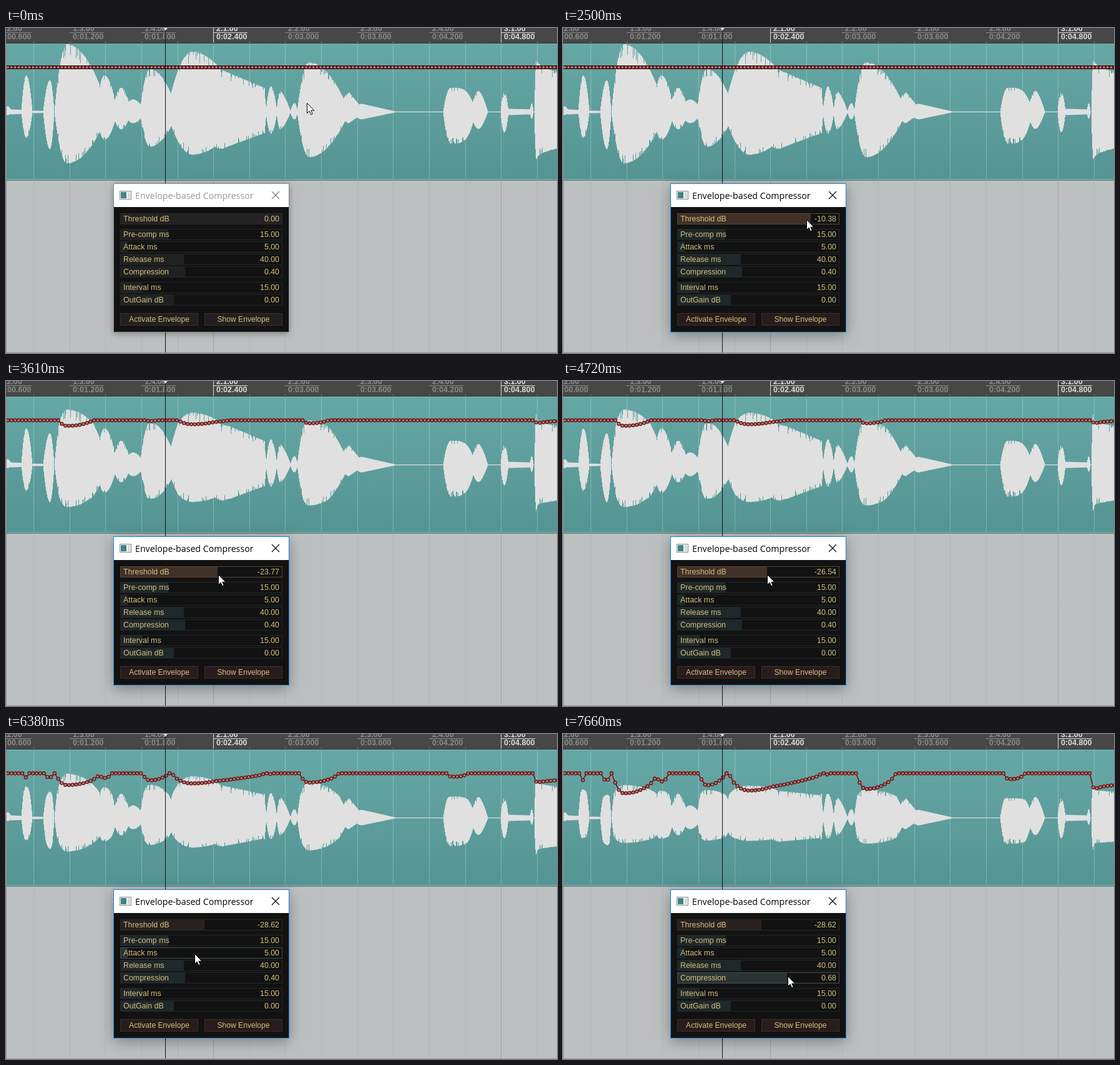
Recreate the animation shown at these times as an HTML page with a canvas. Size 883x521 px, loop 8000 ms.

```html
<!DOCTYPE html>
<html lang="en">
<head>
<meta charset="utf-8">
<title>Envelope-based Compressor</title>
<style>
html, body { margin: 0; width: 883px; height: 521px; overflow: hidden; background: #bcc0c0; }
canvas { display: block; }
</style>
</head>
<body>
<canvas id="stage" width="883" height="521"></canvas>
<script>
const W = 883, H = 521, LOOP = 8000, MID = 134.5, BEAT = 57.63, GRID0 = 44, DOT = 5.76;
const SANS = '"Liberation Sans", Arial, sans-serif';
const c = document.getElementById('stage').getContext('2d');

// Sound bursts: start, peak, end, height up, height down, decay power, level kept at the end
const BURSTS = [
  [-6, 2, 9, 9, 5], [4, 8, 26, 4, 4, 1, .8], [24, 32, 42, 59, 42], [40, 44, 78, 2, 2],
  [59, 70, 77, 51, 60], [77, 97, 165, 109, 83], [144, 157, 178, 59, 45], [170, 184, 200, 39, 28],
  [188, 203, 222, 20, 18], [214, 230, 275, 69, 56], [257, 298, 382, 97, 69], [300, 345, 414, 68, 60, 1, .57],
  [416, 424, 434, 41, 35], [433, 439, 456, 33, 28, 1.5], [455, 462, 467, 14, 12], [466, 485, 550, 80, 73],
  [535, 549, 575, 32, 18, 1], [555, 570, 627, 13, 12, 1], [700, 712, 752, 39, 51, 4],
  [744, 757, 772, 34, 28, 1.5], [792, 798, 805, 32, 33], [802, 806, 842, 5, 5, 1, .8],
  [839, 842, 845, 14, 11], [846, 850, 900, 88, 80, .35, .7]
];

// Hand movement and settings: time, cursor x, cursor y, threshold, compression
const POSES = [
  [0, 482, 120, 0, .4], [870, 185, 345, 0, .4], [1040, 210, 427, 0, .4], [1420, 335, 387, 0, .4],
  [2130, 431, 307, 0, .4], [2500, 390, 307, -10.38, .4], [3240, 340, 310, -23.77, .4],
  [4345, 339, 310, -23.77, .4], [4720, 327, 310, -26.54, .4], [5090, 317, 310, -28.62, .4],
  [5830, 317, 310, -28.62, .4], [6380, 302, 352, -28.62, .4], [6750, 290, 394, -28.62, .4],
  [7480, 360, 388, -28.62, .68]
];

// Picture changes: first, last, count
const RUNS = [[0, 0, 1], [180, 1220, 7], [1420, 2130, 5], [2500, 3240, 5], [3610, 3610, 1], [4160, 4160, 1],
  [4530, 5090, 4], [5460, 5460, 1], [6010, 6930, 6], [7110, 7660, 4]];
const STEPS = RUNS.flatMap(([a, b, n]) =>
  Array.from({ length: n }, (_, i) => n < 2 ? a : Math.round((a + (b - a) * i / (n - 1)) / 10) * 10));

function poseAt(t) {
  const i = POSES.findIndex(p => p[0] > t);
  if (i < 0) return POSES[POSES.length - 1];
  const a = POSES[i - 1], b = POSES[i], k = (t - a[0]) / (b[0] - a[0]);
  return a.map((v, j) => v + (b[j] - v) * k);
}

function noise(n) {
  const v = Math.sin(n * 127.1 + 11.7) * 43758.5453;
  return v - Math.floor(v);
}

function shape(x, [a, peak, b, , , power = 2, keep = 0]) {
  if (x <= a || x >= b + 3) return 0;
  if (x < peak) return 1 - ((peak - x) / (peak - a)) ** 2;
  if (x > b) return keep * (1 - (x - b) / 3);
  return 1 - (1 - keep) * ((x - peak) / (b - peak)) ** power;
}

const loud = side => Array.from({ length: W + 12 }, (_, x) =>
  Math.max(.6, ...BURSTS.map(b => shape(x, b) * b[side])));
const up = loud(3), down = loud(4);

// Level in dB, averaged over a short window
const level = up.map((_, x) => {
  let sum = 0, n = 0;
  for (let i = Math.max(0, x - 3); i <= Math.min(up.length - 1, x + 3); i++, n++) sum += (up[i] + down[i]) / 2;
  return 20 * Math.log10(sum / n / 96) - 19.4;
});

// Gain reduction in pixels of envelope travel
function cutAt(x, env) {
  return env ? Math.max(0, level[Math.round(x)] - env.thr) * env.comp / .1954 : 0;
}

// Thin notches along the louder edges
function ragged(h, seed) {
  if (h < 24) return h;
  const r = noise(seed);
  return r > .78 ? h * (1 - .2 * noise(seed + 5000)) : h * (1 - .02 * r);
}

function rect(x, y, w, h, color) {
  c.fillStyle = color;
  c.fillRect(x, y, w, h);
}

function text(s, x, y, font, color, align = 'left') {
  c.font = font;
  c.fillStyle = color;
  c.textAlign = align;
  c.fillText(s, x, y);
}

function box(x, y, w, h, fill, edge) {
  rect(x, y, w, h, edge);
  rect(x + 1, y + 1, w - 2, h - 2, fill);
}

function path(points, close) {
  c.beginPath();
  for (const [x, y] of points) c.lineTo(x, y);
  if (close) c.closePath();
}

function ruler() {
  rect(0, 0, W, 25, '#474747');
  for (let i = 0; i < 15; i++) rect(Math.round(GRID0 + i * BEAT), 22, 1, 3, '#8f8f8f');
  for (let i = 0; i < 8; i++) {
    const x = Math.round(GRID0 + (2 * i - 1) * BEAT), beat = i + 1, major = beat % 4 === 0;
    const color = major ? '#dcdcdc' : '#8a8a8a', font = `bold 12.5px ${SANS}`;
    if (major) rect(x, 0, 1, 25, color);
    rect(x, 7, 55, 1, color);
    text(`${1 + (beat >> 2)}.${beat % 4 + 1}.00`, x + 5, 4.5, font, color);
    text(`0:0${(beat * .6).toFixed(3)}`, x + 5, 18, font, color);
  }
}

function track(env) {
  const g = c.createLinearGradient(0, 25, 0, 244);
  g.addColorStop(0, '#66a8a6');
  g.addColorStop(.45, '#5e9f9d');
  g.addColorStop(1, '#549493');
  rect(0, 24, W, 1, '#2d3c3c');
  rect(0, 25, W, 219, g);
  rect(0, 25, W, 1, '#7dbab8');
  rect(0, 242, W, 1, '#7ab3b1');
  rect(0, 244, W, 1, '#858a8a');
  for (let i = 0; i < 15; i++) {
    const x = Math.round(GRID0 + i * BEAT), bar = i % 8 === 5;
    for (let y = 28; y < 242; y += 2) rect(x, y, 1, 1, 'rgba(225,240,240,.6)');
    for (let y = 246; y < 520; y += 2) rect(x, y, 1, bar ? 1 : 2, bar ? '#858888' : '#b2b6b6');
  }
  for (let x = 1; x < W; x++) {
    const gain = Math.exp(-.0225 * cutAt(x, env));
    const top = Math.max(25, MID - Math.max(.6, ragged(up[x], x) * gain));
    const bottom = MID + Math.max(.6, ragged(down[x], x + 2000) * gain);
    rect(x, top, 1, bottom - top, '#e0e0e0');
  }
}

function envelope(env) {
  const dots = [];
  for (let x = 3; x < W + 6; x += DOT) dots.push([x, 63 + cutAt(x, env)]);
  if (env) {
    path([[1, dots[0][1]], ...dots]);
    c.strokeStyle = '#6d1010';
    c.lineWidth = 1.6;
    c.stroke();
  } else {
    rect(1, 60, W, 6, '#2b1010');
    rect(1, 61, W, 4, '#800c0c');
  }
  c.lineWidth = 1.3;
  c.strokeStyle = '#7d0808';
  c.fillStyle = env ? '#8c8a88' : '#a09694';
  for (const [x, y] of dots) {
    c.beginPath();
    c.arc(x, y, env ? 2.5 : 1.7, 0, 7);
    c.fill();
    if (env) c.stroke();
  }
}

function playhead() {
  rect(255, 4, 1, 517, '#101010');
  path([[252, 0], [259, 0], [255.5, 4]], true);
  c.fillStyle = '#e8e8e8';
  c.fill();
}

// Colours of a slider: resting, awake, under the cursor
const WARM = { edge: ['#2c2a2a', '#302926', '#5a4638'], fill: ['#242222', '#2a2220', '#403128'] };
const COOL = { edge: ['#222728', '#222728', '#435052'], fill: ['#202122', '#1f282a', '#2b3435'] };

function slider({ y, name, value, part, look = COOL }, mood) {
  const width = Math.round(259 * part), font = `12.4px ${SANS}`;
  box(183, y, 260, 18, '#121212', look.edge[mood]);
  rect(184, y + 1, width - 1, 16, look.fill[mood]);
  text(name, 188, y + 13, font, '#d6bf7d');
  text(value.toFixed(2), 438, y + 13, font, '#d6bf7d', 'right');
}

function panel(t, cx, cy, thr, comp) {
  const on = t >= 2500;
  c.save();
  c.shadowColor = on ? 'rgba(0,0,0,.36)' : 'rgba(0,0,0,.38)';
  c.shadowBlur = on ? 22 : 11;
  c.shadowOffsetY = on ? 5 : 2;
  rect(173, 250, 280, 237, '#121212');
  c.restore();
  rect(172, 249, 282, 239, on ? '#1a82d8' : '#868a8a');
  rect(173, 250, 280, 37, '#ffffff');
  rect(173, 287, 280, 200, '#121212');

  box(182, 261, 19, 14, '#f4f6f6', '#858b8e');
  rect(184, 263, 9, 10, '#3d8582');
  rect(195, 263, 4, 10, '#d5dada');
  text('Envelope-based Compressor', 207, 274, '14.2px "Open Sans", "Noto Sans", sans-serif', on ? '#000' : '#979797');
  c.strokeStyle = on ? '#000' : '#777';
  c.lineWidth = 1.1;
  for (const dy of [6, -6]) {
    path([[426, 268 - dy], [438, 268 + dy]]);
    c.stroke();
  }

  const rows = [
    { y: 297, name: 'Threshold dB', value: thr, part: 1 + thr / 60, look: WARM },
    { y: 322, name: 'Pre-comp ms', value: 15, part: .297 },
    { y: 342, name: 'Attack ms', value: 5, part: .046 },
    { y: 362, name: 'Release ms', value: 40, part: .392 },
    { y: 382, name: 'Compression', value: comp, part: comp },
    { y: 407, name: 'Interval ms', value: 15, part: .138 },
    { y: 427, name: 'OutGain dB', value: 0, part: 1 / 3 }
  ];
  for (const row of rows) {
    const hover = on && cy >= row.y && cy < row.y + 18;
    const awake = on || (row.look !== WARM && t >= 1040);
    slider(row, hover ? 2 : awake ? 1 : 0);
  }
  [['Activate Envelope', 183], ['Show Envelope', 318]].forEach(([name, x]) => {
    box(x, 457, 125, 20, on ? '#281c1c' : '#212020', '#462b2b');
    text(name, x + 62.5, 471, `12.1px ${SANS}`, '#d6bf7d', 'center');
  });
}

function cursor(x, y) {
  c.save();
  c.translate(x + .5, y + .5);
  path([[0, 0], [0, 16], [3.7, 12.6], [6.2, 18.3], [8.7, 17.2], [6.3, 11.7], [11.4, 11.7]], true);
  c.fillStyle = '#fff';
  c.fill();
  c.strokeStyle = '#000';
  c.lineWidth = 1;
  c.stroke();
  c.restore();
}

function draw(t) {
  // The track is processed a moment after each release of the slider
  const env = t < 3610 ? null : { thr: t < 5460 ? -23.77 : -28.62, comp: t < 7660 ? .4 : .68 };
  const [, px, py, thr, comp] = poseAt(t), cx = Math.round(px), cy = Math.round(py);
  rect(0, 0, W, H, '#bcc0c0');
  ruler();
  track(env);
  envelope(env);
  playhead();
  rect(0, 25, 1, 496, '#8d9292');
  rect(0, 520, W, 1, '#8f9494');
  panel(t, cx, cy, thr, comp);
  cursor(cx, cy);
}

let shown = -1;
function tick() {
  const t = performance.now() % LOOP;
  const step = STEPS.filter(s => s <= t).pop();
  if (step !== shown) draw(shown = step);
  requestAnimationFrame(tick);
}
tick();
</script>
</body>
</html>
```
